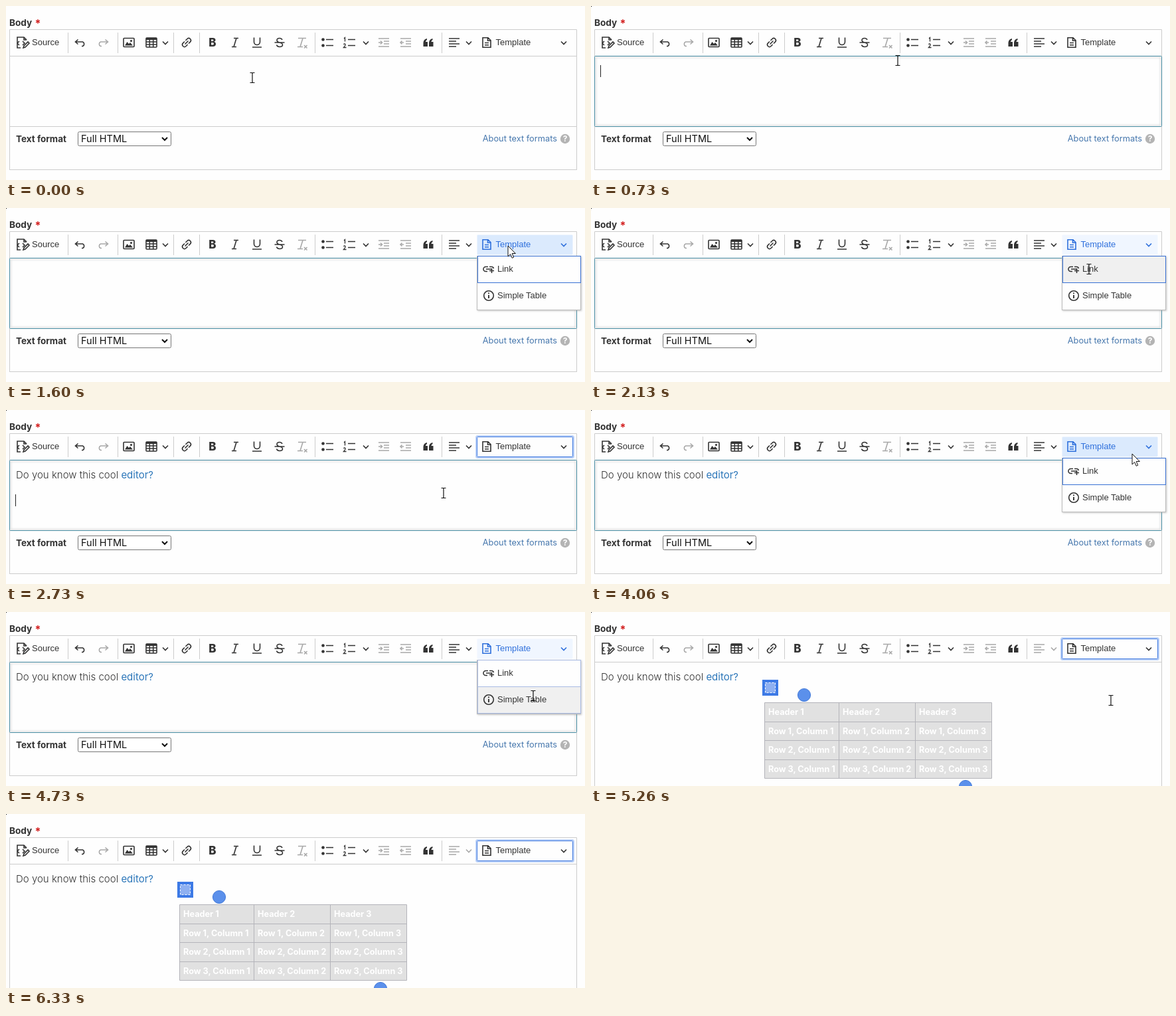
Recreate the animation shown at these times as an HTML page. Size 872 by 262 pixels, loop 6400 ms.

```html
<!DOCTYPE html>
<html lang="en">
<head>
<meta charset="utf-8">
<title>Editor template demo</title>
<style>
html, body { margin: 0; width: 872px; height: 262px; overflow: hidden; background: #fefefe; }
svg { display: block; }
text { font-family: Inter, "Open Sans", sans-serif; fill: #333; white-space: pre; }
.ui { font: 13px "Liberation Sans", Arial, sans-serif; }
.bold { font-weight: 700; }
.icon { fill: none; stroke: #333; stroke-width: 1.6; }
.icon .solid, .solid { fill: #333; stroke: none; }
.dim { opacity: .42; }
.frame { fill: none; stroke: #ccc; }
#button .icon, #button .tint { stroke: var(--ink); }
#button text { fill: var(--ink); }
</style>
</head>
<body>
<svg width="872" height="262" viewBox="0 0 872 262">
  <defs>
    <filter id="blur"><feGaussianBlur stdDeviation="1.5"/></filter>
    <path id="chevron" d="M-4 -2L0 2L4 -2"/>
  </defs>
  <text class="bold" x="5" y="30" font-size="13.6">Body</text>
  <text class="bold" x="43.5" y="32" font-size="16" style="fill:#d32020">*</text>
  <path id="corner" d="M0 0h1v1h-1z"/>

  <path class="frame" d="M5.5 262V35.5H859.5V262M5.5 75.5H859.5"/>
  <g id="footer">
    <path class="frame" d="M5.5 181.5H859.5M5.5 246.5H859.5"/>
    <path d="M0 247H872V262H0Z" fill="#fefefe"/>
    <text class="bold" x="15" y="205" font-size="13.5">Text format</text>
    <rect x="108.5" y="189.5" width="140" height="21" rx="2" fill="#fff" stroke="#767676"/>
    <text x="113" y="205" font-size="14.5" style="fill:#111">Full HTML</text>
    <path d="M235 198L239 202L243 198" fill="none" stroke="#111" stroke-width="2"/>
    <text x="830" y="204" font-size="12.8" text-anchor="end" style="fill:#4677ad">About text formats</text>
    <circle cx="842" cy="200" r="7.2" fill="#b4b4b4"/>
    <text class="bold" x="842" y="204.3" font-size="12" text-anchor="middle" style="fill:#fff">?</text>
  </g>
  <g id="focus">
    <rect x="7" y="77" width="851" height="103" fill="none" stroke="#ddd" stroke-width="2" filter="url(#blur)"/>
    <rect x="5.5" y="75.5" width="854" height="106" rx="1" fill="none" stroke="#4b90a6"/>
  </g>

  <path d="M93.5 40V71M168.5 40V71M252.5 40V71M291.5 40V71M465.5 40V71M656.5 40V71" stroke="#ccc"/>
  <g id="tools"></g>
  <text class="ui" x="39" y="59">Source</text>

  <g id="button">
    <rect id="glow" x="708.5" y="39.5" width="146" height="32" rx="2" fill="none" stroke="#bcd2f8" stroke-width="3"/>
    <rect id="face" x="709.5" y="40.5" width="144" height="30" rx="1"/>
    <g class="icon" transform="translate(724 55)">
      <path d="M-6 -7.2H2L6 -3.2V7.2H-6ZM1.5 -7V-2.8H6M-3 .5H3M-3 3.8H3"/>
    </g>
    <text class="ui" x="737.5" y="59">Template</text>
    <use class="icon" href="#chevron" x="840" y="55.5"/>
  </g>

  <g id="line">
    <text x="15" y="103" font-size="15" font-weight="300">Do you know this cool <tspan fill="#2b76b9" font-weight="400">editor?</tspan></text>
  </g>
  <path id="caret" stroke="#222"/>
  <g id="table"></g>

  <g id="menu">
    <rect x="710" y="73" width="157" height="82" fill="#999" opacity=".55" filter="url(#blur)"/>
    <rect x="709.5" y="72.5" width="156" height="81" fill="#fefefe" stroke="#bbb"/>
    <rect id="row0" x="710.5" y="72.5" width="155" height="40"/>
    <rect id="row1" x="710.5" y="112.5" width="155" height="40"/>
    <g class="icon">
      <path d="M725 95.5H722.5A3.5 3.5 0 0 1 722.5 88.500H726M728 88.500H731A3.500 3.500 0 0 1 734.500 91M723 92H731M731.500 91V98M728 94.500H735"/>
      <circle cx="727" cy="132" r="7.3"/>
      <path d="M727 131V136M727 127.500V129.300" stroke-width="1.9"/>
    </g>
    <text class="ui" x="740" y="96">Link</text>
    <text class="ui" x="740" y="136">Simple Table</text>
  </g>

  <g id="cursor">
    <path id="beam" d="M-3.500 -7.500H-1Q0 -7.500 0 -6.500Q0 -7.500 1 -7.500H3.500M0 -6.500V6.500M-3.500 7.500H-1Q0 7.500 0 6.500Q0 7.500 1 7.500H3.500" fill="none" stroke="#111" stroke-width="1.2"/>
    <path id="arrow" d="M0 0V16L3.700 12.500L6.200 18.300L8.700 17.200L6.200 11.500H11.300Z" fill="#fff" stroke="#111"/>
  </g>
</svg>
<script>
const $ = id => document.getElementById(id);
const show = (id, on) => $(id).style.display = on ? '' : 'none';
const paint = (id, fill, stroke) => { $(id).setAttribute('fill', fill); $(id).setAttribute('stroke', stroke); };

const chevron = '<use href="#chevron" y=".5"/>';
const undo = '<path d="M-3.500 -4.500L-7.500 -1L-3.500 2.500M-7 -1H3.500A3.500 3.500 0 0 1 3.500 5.500H2"/>';
const indent = '<path d="M-8 -6H8M0 -2H8M0 2H8M-8 6H8M-8 0H-3"/>';
const glyph = (s, style) => `<text text-anchor="middle" y="6" font-size="17" style="stroke:none;${style}">${s}</text>`;

// [x, markup, dim, id]
const icons = [
  [25, '<path d="M-3 8H-8V-8H2L6 -4M2 -8V-4H6M-5 -2L-8 1L-5 4M0 -2L3 1L0 4M1 8L2 5L8 -1L10 1L4 7Z"/>'],
  [112, undo],
  [146, `<g transform="scale(-1 1)">${undo}</g>`, 1],
  [185, '<rect x="-8" y="-6.500" width="16" height="13" rx="1"/><path class="solid" d="M-6 4.500L-2.500 -1L0 2L2 0L6 4.500Z"/><circle class="solid" cx="3.500" cy="-2.500" r="1.600"/>'],
  [219, '<rect x="-8" y="-7" width="16" height="14" rx="1"/><path d="M-8 -5.500H8" stroke-width="3"/><path d="M-8 -1H8M-8 3H8M-2.700 -5V7M2.700 -5V7"/>'],
  [240, chevron],
  [272, '<g transform="rotate(-45)"><path d="M-1 -3.200H-4.500A3.200 3.200 0 0 0 -4.500 3.200H-1M1 -3.200H4.500A3.200 3.200 0 0 1 4.500 3.200H1M-3.500 0H3.500"/></g>'],
  [311, glyph('B', 'font-weight:800')],
  [345, '<path d="M-2 -6.500H5M-5 6.500H2M2 -6.500L-2 6.500"/>'],
  [378, '<path d="M-4.500 -7.500V-1A4.500 4.500 0 0 0 4.500 -1V-7.500M-7 7H7"/>'],
  [412, '<path d="M4 -4Q3 -6.500 0 -6.500Q-4 -6.500 -4 -3.500Q-4 -1 0 0Q4.500 1 4.500 3.500Q4.500 6.500 0 6.500Q-3.500 6.500 -4.500 3.500M-7.500 0H7.500"/>'],
  [446, '<path d="M-6 -6.500H6M1 -6.500L-3 6.500M-7 6.500H1M3 4L7.500 8.500M7.500 4L3 8.500"/>', 1],
  [484, '<path d="M-2 -4.500H9M-2 4.500H9"/><circle class="solid" cx="-6.500" cy="-4.500" r="2.300"/><circle class="solid" cx="-6.500" cy="4.500" r="2.300"/>'],
  [517, '<path d="M-2 -4.500H9M-2 4.500H9"/><path d="M-8 -6L-6.500 -7.500V-1.500M-8.500 3Q-8 1.800 -6.500 2Q-4.500 3 -8.500 7.500H-4.500" stroke-width="1.300"/>'],
  [542, chevron],
  [569, indent + '<path d="M-5 -2.500L-2.500 0L-5 2.500"/>', 1],
  [602, indent + '<path d="M-5.500 -2.500L-8 0L-5.500 2.500"/>', 1],
  [636, '<path class="solid" d="M-7.500 0Q-7 -5 -2 -6V-4Q-4 -3 -4 -1H-1V6H-7.500ZM1 0Q1.500 -5 6.500 -6V-4Q4.500 -3 4.500 -1H7.500V6H1Z"/>'],
  [675, '<path d="M-8 -6H8M-8 -2H3M-8 2H8M-8 6H3"/>', 0, 'align'],
  [697, chevron, 0, 'alignMore'],
];
$('tools').innerHTML = icons.map(([x, body, dim, id]) =>
  `<g class="icon ${dim ? 'dim' : ''}" ${id ? `id="${id}"` : ''} transform="translate(${x} 55)">${body}</g>`).join('');

const left = [261.5, 373.5, 488.5], top4 = [136.5, 165.5, 193.5, 222.5];
const cells = top4.flatMap((y, r) => left.map((x, c) =>
  `<text class="bold" x="${x + 5.5}" y="${y + 18.500}" font-size="12.700" style="fill:#fff">${r ? `Row ${r}, Column` : 'Header'} ${c + 1}</text>`));
const disc = (x, y) => `<circle cx="${x}" cy="${y}" r="9.600" fill="#5b90eb" stroke="#4078d8"/>`;
$('table').innerHTML = `
  <path d="M261.500 136.500H603.500V250.500H261.500ZM261.500 165.500H603.500M261.500 193.500H603.500M261.500 222.500H603.500M373.500 136.500V250.500M488.500 136.500V250.500" fill="#e1e1e1" stroke="#b4b4ba"/>
  ${cells.join('')}
  <path d="M258 102h24v24h-24z" fill="#3d7ae6"/>
  <path d="M262.500 106.500h15v15h-15z" fill="#8eb0f1" stroke="#fff" stroke-dasharray="3 2"/>
  ${disc(321, 125)}${disc(564, 263)}`;

// pointer path: [ms, x, y]
const path = [
  [0, 371, 108], [300, 371, 108], [730, 462, 82], [1330, 756, 62], [1600, 756, 57],
  [1800, 756, 57], [2130, 750, 92], [2400, 750, 92], [2730, 659, 125], [2930, 659, 125],
  [3500, 803, 73], [3660, 815, 68], [4100, 815, 66], [4600, 794, 126], [5200, 794, 126],
  [5600, 648, 227], [6400, 648, 227],
];
function pointer(t) {
  const i = path.findIndex(p => p[0] > t);
  const [t0, x0, y0] = path[i - 1], [t1, x1, y1] = path[i];
  const u = (t - t0) / (t1 - t0), k = u * u * (3 - 2 * u);
  return [x0 + (x1 - x0) * k, y0 + (y1 - y0) * k];
}
const within = (t, a, b) => t >= a && t < b;

function draw(ms) {
  const t = Math.floor(ms * .015 + .1) / .015;
  const [x, y] = pointer(Math.min(t, 6399));
  const linked = t >= 2320, table = t >= 4790;
  const second = within(t, 3850, 4790), open = within(t, 1520, 2320) || second;
  const onButton = y < 72 && x > 709 && x < 854;

  show('corner', t > 50);
  show('focus', t >= 300 && !table);
  show('footer', !table);
  show('line', linked);
  show('table', table);
  show('menu', open);
  for (const id of ['align', 'alignMore']) $(id).classList.toggle('dim', table);

  const start = linked ? 2320 : 300;
  show('caret', (within(t, 300, 1300) || within(t, 2320, 3520)) && (t - start) % 1000 < 500);
  $('caret').setAttribute('d', linked ? 'M14.500 127V145' : 'M14.500 89V107');

  const ring = linked && !open;
  show('glow', ring && !onButton);
  $('button').style.setProperty('--ink', open ? '#2f70dc' : '#333');
  if (open) paint('face', onButton ? '#dbeafd' : '#f0f6ff', 'none');
  else if (onButton) paint('face', '#eeeef2', ring ? '#b3c5ea' : 'none');
  else paint('face', ring ? '#fefefe' : 'none', ring ? '#3f78df' : 'none');

  const low = second && y > 112;
  paint('row0', within(y, 72, 112) ? '#f0f0f0' : '#fefefe', low ? '#a9bbe4' : '#3770d4');
  paint('row1', low ? '#f0f0f0' : 'none', low ? '#a9bbe4' : 'none');

  const arrow = y < 75;
  show('cursor', t < 6190);
  show('arrow', arrow);
  show('beam', !arrow);
  $('cursor').setAttribute('transform', `translate(${Math.round(x)} ${Math.round(y)})`);
}

const begin = performance.now();
(function tick() {
  draw((performance.now() - begin) % 6400);
  requestAnimationFrame(tick);
})();
</script>
</body>
</html>
```
